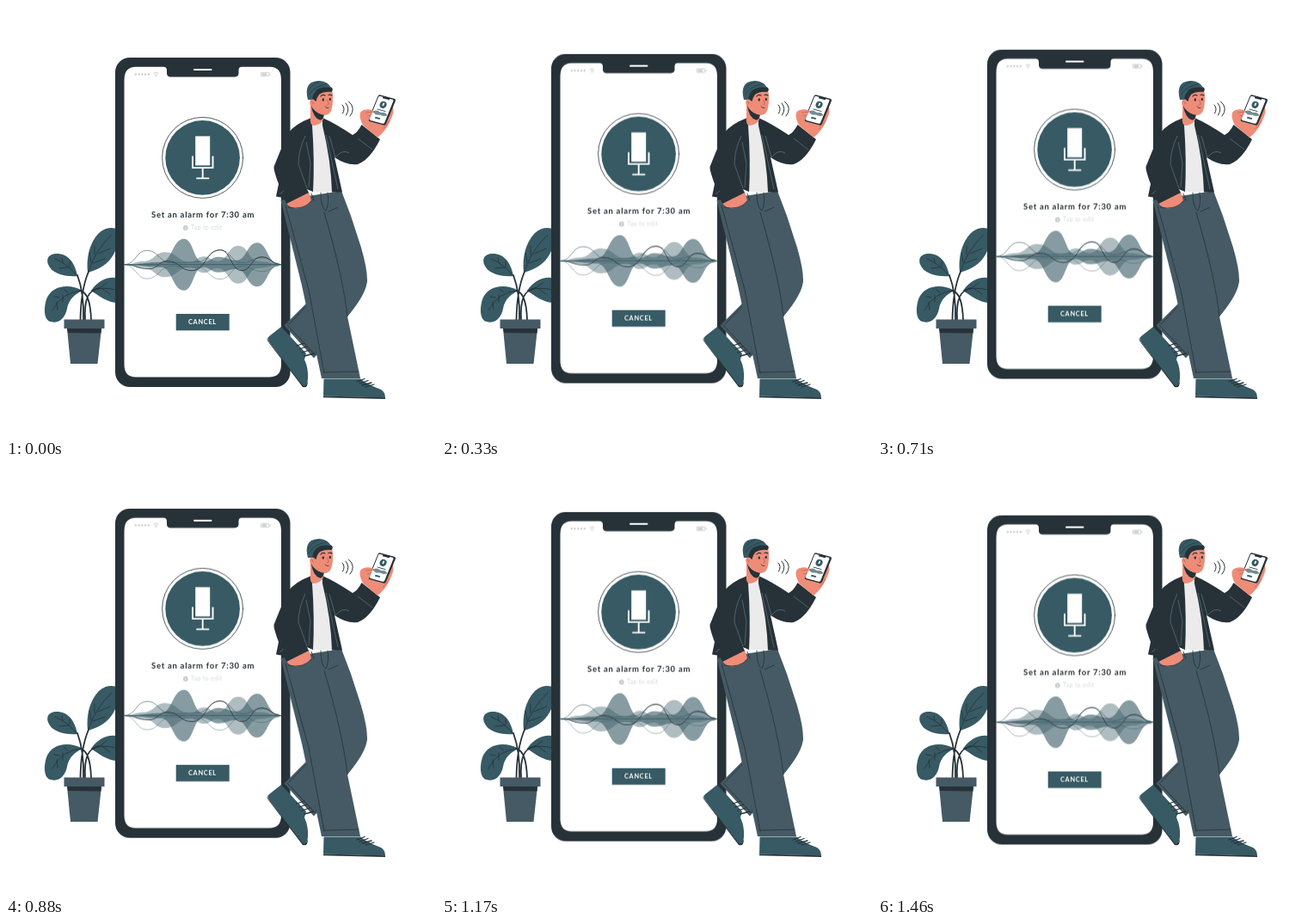
An HTML page for the animation above (1.5 s loop, 500x500 px).

```html
<!DOCTYPE html>
<html lang="en">
<head>
<meta charset="utf-8">
<title>Voice assistant</title>
<style>
  :root { --ink: #263238; --slate: #455a64; --teal: #375a64; --skin: #ee8c78; }
  html, body { margin: 0; width: 100%; height: 100%; overflow: hidden; background: #fff; }
  svg { display: block; width: 100vw; height: 100vh; }
  text { font-family: Lato, "Open Sans", sans-serif; }
  .ink { fill: var(--ink); }
  .slate { fill: var(--slate); }
  .teal { fill: var(--teal); }
  .skin { fill: var(--skin); }
  .white { fill: #fff; }
  .line { fill: none; stroke: var(--ink); stroke-width: .8; stroke-linecap: round; stroke-linejoin: round; }
  .pale { fill: #c9cccd; }
  .float { animation: float 1.5s linear infinite; }
  @keyframes float { 50% { transform: translateY(-10px); } }
</style>
</head>
<body>
<svg viewBox="0 0 500 500">
  <g id="plant">
    <g class="teal">
      <path d="M95 310C93 293 97 275 108 264C116 257 125 257 130 260C132 279 126 302 95 310Z"/>
      <path d="M83 314C73 315 57 313 51 304C45 295 49 288 59 288C72 288 80 298 83 314Z"/>
      <path d="M89 331C73 322 53 325 47 341C43 354 45 366 52 367C62 370 69 362 71 352C73 341 80 335 89 331Z"/>
      <path d="M99 331C107 319 120 313 132 317V345C119 346 108 337 99 331Z"/>
    </g>
    <g class="line">
      <path d="M95 311Q104 283 123 266M99 298L97 287M103 289L103 279M101 299L115 294M107 288L121 282"/>
      <path d="M83 314Q72 300 57 294M74 303L74 297M66 298L65 293M73 304L62 305"/>
      <path d="M89 331Q65 332 54 354M72 333L67 329M62 339L56 338M66 336L66 344M59 344L60 353"/>
      <path d="M99 331Q112 326 128 330M109 328L117 322M111 328L121 335"/>
    </g>
    <path class="line" style="stroke-width:1.800" d="M86.500 365Q87 330 96 309M90 365Q91 334 83 313M92 365Q91 347 95 338Q98 331 108 328M99 365Q98 333 86 331"/>
    <path class="slate" d="M67.500 364.500H114.500V375H67.500ZM71 375H111L106.500 416H75Z"/>
    <path class="ink" d="M71 375H111L110.500 380.500Q90 380 72 380Z"/>
  </g>

  <g id="phone" class="float">
    <rect class="ink" x="127" y="60" width="203.500" height="383" rx="17"/>
    <path class="white" d="M151 70.800H183Q187 70.800 187 75V78Q187 82.400 191 82.400H266Q270.500 82.400 270.500 78V75Q270.500 70.800 274 70.800H307Q320 70.800 320 86V417Q320 431.500 306 431.500H151Q137.500 431.500 137.500 417V86Q137.500 70.800 151 70.800Z"/>
    <g transform="translate(0 .4)">
      <path d="M219 73.500H238.500" stroke="#fff" stroke-width="2" stroke-linecap="round"/>
      <path d="M150.800 79H167" stroke="#c9cccd" stroke-width="2.400" stroke-linecap="round" stroke-dasharray="0 3.750"/>
      <g fill="none" stroke="#c9cccd" stroke-width=".9">
        <path d="M171.500 78Q174.500 75.500 177.500 78M172.800 79.600Q174.500 78.200 176.200 79.600"/>
        <rect x="296.300" y="77" width="9.500" height="4.300" rx=".8"/>
        <path d="M307 78V80.300"/>
      </g>
      <circle class="pale" cx="174.500" cy="80.800" r=".8"/>
      <rect class="pale" x="297.500" y="78" width="5.500" height="2.400"/>

      <circle class="line" cx="228.600" cy="176" r="47"/>
      <circle class="teal" cx="228.600" cy="176" r="43.300"/>
      <rect class="white" x="220.200" y="151" width="17" height="34"/>
      <path d="M217 174V187.700H240.500V174M228.700 188V200M221.300 200H236.300" fill="none" stroke="#fff" stroke-width="1.900"/>

      <text class="ink" x="169" y="245.700" font-size="9.500" font-weight="700" letter-spacing=".72">Set an alarm for 7:30 am</text>
      <circle class="pale" cx="208.800" cy="257.600" r="2.900"/>
      <path d="M208.800 257.100V259.300M208.800 255.800V256.300" stroke="#fff" stroke-width=".7"/>
      <text x="215" y="260.100" font-size="6.800" letter-spacing=".45" fill="#d6d8d9">Tap to edit</text>

      <g id="waves" transform="translate(0 300.300)"></g>

      <rect class="teal" x="197.700" y="357.600" width="62" height="19.300"/>
      <text class="white" x="212" y="369.800" font-size="7.400" font-weight="700" letter-spacing=".7">CANCEL</text>
    </g>
  </g>

  <g id="legs">
    <path class="slate" d="M372 300L352 343L323.500 371.500L358 409.500L397 361Q420 334 420 318Z"/>
    <path class="line" d="M352 346L329 370M327 371L360 406M353 343L361 405"/>
    <path class="teal" d="M320 373L306 384Q303 387 306 391L345 442Q350 443 351 434Q352 422 347 411L349 404Z"/>
    <path class="ink" d="M305 385Q303 388 306 391L345 441Q349 443 351 436Q351 445 345 443L304.500 390Q302.500 387 305 385Z"/>
    <path class="line" style="stroke-width:1.300" d="M338 395L347 392M341 399L350 396M344 403L353 400M347 407L358 404"/>
    <path class="slate" d="M319.500 226L390 215L401 244L413 281Q420 305 420 319Q417 335 397 361L412 433H367L344 325Z"/>
    <path class="line" d="M370 240Q392 315 397 361M325 232L352 330L370 427M369 426L410 425M355 218L358 226M366 217Q366 235 372 238Q376 230 374 217M375 239L386 234"/>
    <path class="teal" d="M369.500 433.500H412Q418 439 436 446Q441 449 441 455.500L369 453.500Z"/>
    <path class="ink" d="M369 453.500L441 455.300V457L369 455.200Z"/>
    <path class="line" style="stroke-width:1.300" d="M408 437L417 433.500M411 439L421 435.500M414 441L425 438M418 443L428 440"/>
  </g>

  <g id="torso">
    <path d="M355 138L370 132L382 216H355Z" fill="#ebebeb"/>
    <path class="skin" d="M326 229L352 216L355 226Q351 233 341 235Q331 237 326 229Z"/>
    <path class="line" d="M328 234Q346 238 355 227"/>
    <path class="ink" d="M355 130Q336 137 328 148Q323 158 311.500 187Q311 191 317 207L314 221.500L323 223L326 230L352 217L350 213L357 216Q359 180 356 139Z"/>
    <path class="ink" d="M368 130Q382 136 403 150Q409 147 413.500 138L435 155Q423 179 409 184Q397 186 382 176L391 216.500H379Q378 180 368 139Z"/>
    <path d="M348 151Q340 168 340 184L350 212M349 158L354 183L352 211M318 219L323 215M376 151L383 176M383 176Q391 166 399 171M372 150L386 213M409 154L426 167" fill="none" stroke="#607780" stroke-width=".7"/>
  </g>

  <g id="head">
    <path class="skin" d="M354 114L369 124L369 132Q365 139 357 139Q353 137 354 130Z"/>
    <path class="ink" d="M355 116Q361 126 370 126Q369 133 365 132.500Q357 130 355 116Z"/>
    <path class="skin" d="M357 101L379 97Q381 106 379.500 116Q378 127 371 127Q362 126 356 118Z"/>
    <path class="ink" d="M355 110Q355 97 362 94Q373 91 379 95Q381 98 378 100Q370 99 364 103Q361 107 360.500 111L357 109Z"/>
    <path class="teal" d="M351 109Q347 94 355 89Q366 84 375 91L378 95Q367 93 361 98Q357 102 356 109Z"/>
    <path class="line" style="stroke-width:.6" d="M353 103Q355 95 373 90.500M352 98Q356 91 364 88"/>
    <ellipse class="skin" cx="356.300" cy="112.500" rx="3.100" ry="4"/>
    <path d="M355 111Q357 112 357 114M373 109Q377 114 373.500 115" fill="none" stroke="#b85f50" stroke-width=".8"/>
    <ellipse class="ink" cx="368.800" cy="109" rx="1.200" ry="1.700"/>
    <ellipse class="ink" cx="376.800" cy="108.500" rx="1.100" ry="1.700"/>
    <path class="line" style="stroke-width:1.200" d="M366 105Q368 102.500 371 104M375 103.500Q377 102.500 379 104"/>
    <path class="line" d="M371 117Q372 119 375 118.500"/>
  </g>
  <path class="line" style="stroke-width:1" d="M391 115Q395 119 391.500 125M395 113Q400.500 119 395.500 127M398.500 111Q407.500 119 400 128"/>

  <g id="hand">
    <path class="skin" d="M440 112L449 115Q453 121 447 133Q442 145 432 153L415 138.500Q410 129 412 124Q415 120 424 121L437 126Z"/>
    <g transform="matrix(.93 .25 -.385 .95 437 120.700)">
      <rect class="ink" x="-10.700" y="-16" width="22" height="32.500" rx="2.500"/>
      <path class="white" d="M-7.700 -14.500H-4.500V-13H4V-14.500H7.500Q9 -14.500 9 -13V13Q9 15 7 15H-8Q-9.700 15 -9.700 13V-13Q-9.700 -14.500 -7.700 -14.500Z"/>
      <circle class="teal" cx="-.8" cy="-6" r="4.100"/>
      <path class="white" d="M-1.600 -8.200H.2V-4.700H-1.600Z"/>
      <path class="ink" d="M-5.500 .3H5V1H-5.500Z"/>
      <path class="teal" opacity=".7" d="M-9.500 4.500Q-6 1.500 -3 2.500Q0 4 3 2.500Q6 2 9 4.500Q6 6.500 3 6.500Q0 5.500 -3 7Q-6 7.500 -9.500 4.500Z"/>
      <rect class="teal" x="-4" y="9.500" width="6" height="2"/>
    </g>
    <path class="skin" d="M413 123Q417 119 426 121Q429 123 425 125L421 135Q414 134 412 128Z"/>
    <path d="M418 124L426 123M420 128L424 127M438 143Q444 139 446 133" fill="none" stroke="#b85f50" stroke-width=".6"/>
  </g>
</svg>
<script>
  const waves = document.getElementById('waves');

  // Curve through turning points, level at each one.
  const curve = pts => pts.slice(1).map(([x, y], i) => {
    const [px, py] = pts[i], mid = (px + x) / 2;
    return `C${mid} ${py} ${mid} ${y} ${x} ${y}`;
  }).join('');

  const draw = (d, attrs) => {
    const path = document.createElementNS('http://www.w3.org/2000/svg', 'path');
    for (const [key, value] of Object.entries({ d, ...attrs })) path.setAttribute(key, value);
    waves.append(path);
  };

  const flip = pts => pts.map(([x, y]) => [x, -y]);
  const blob = (pts, opacity) => {
    const back = flip(pts).reverse();
    draw(`M${pts[0]}${curve(pts)}L${back[0]}${curve(back)}Z`, { class: 'teal', opacity });
  };
  const strand = (pts, width, color = '--teal') =>
    draw(`M${pts[0]}${curve(pts)}`, { class: 'line', style: `stroke:var(${color});stroke-width:${width}` });

  const tall = [[138, 0], [180, -3], [207, -30], [229, -3], [247, -9], [268, -5], [292, -25.5], [316, -2], [320, 0]];
  const low = [[138, 0], [160, -4], [185, -14.5], [214, -3], [230, -9.5], [246, -4], [270, -22], [294, -4], [320, 0]];
  const thin = [[138, 0], [164, -16.5], [192, -2], [222, -3], [249, -17], [274, -2], [298, -8], [320, 0]];

  blob(low, .4);
  blob(tall, .6);
  strand(thin, .6);
  strand(flip(thin), .4);
  strand([[138, 0], [166, 5], [188, -4], [216, 7], [249, -17], [274, 7], [297, -9], [320, 0]], .8, '--ink');
  strand([[138, 0], [320, 0]], .9);
</script>
</body>
</html>
```
